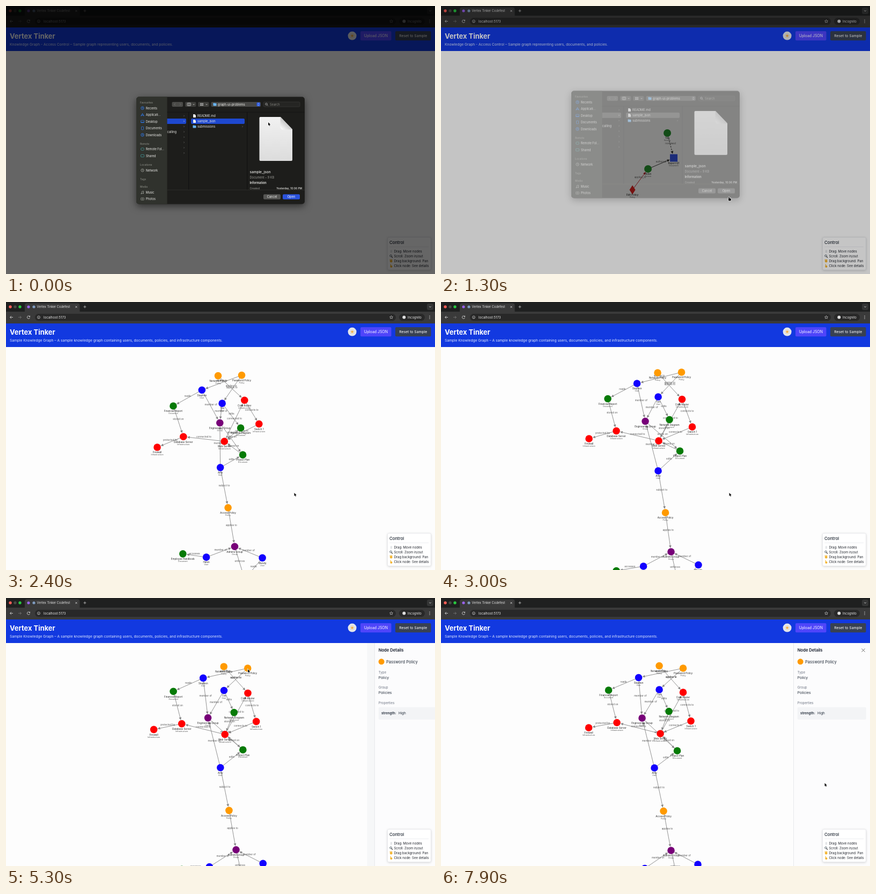
An HTML page with a canvas for the animation above (8000 ms loop, 800 px wide and 500 px high).

```html
<!DOCTYPE html>
<html lang="en">
<head>
<meta charset="utf-8">
<title>Vertex Tinker</title>
<style>
html, body { margin: 0; width: 100%; height: 100%; overflow: hidden; background: #fdfdfd; }
canvas { display: block; width: 800px; height: 500px; }
</style>
</head>
<body>
<canvas id="stage" width="800" height="500"></canvas>
<script>
const LOOP = 8000, LOAD = 1550;
const stage = document.getElementById('stage').getContext('2d');
const sheet = Object.assign(document.createElement('canvas'), { width: 800, height: 500 }).getContext('2d');
let g = stage;

const clamp = x => Math.max(0, Math.min(1, x));
const mix = (a, b, u) => a + (b - a) * u;
const span = (t, a, b) => clamp((t - a) / (b - a));
const smooth = u => u * u * (3 - 2 * u);

// ---------- drawing helpers ----------
function text(s, x, y, size, color, weight = 400, align = 'left') {
  g.font = `${weight} ${size}px Inter, "Open Sans", sans-serif`;
  g.textAlign = align;
  g.fillStyle = color;
  g.fillText(s, x, y + size * .36);
}
function box(x, y, w, h, color, r = 0, stroke) {
  g.beginPath();
  g.roundRect(x, y, w, h, r);
  if (color) { g.fillStyle = color; g.fill(); }
  if (stroke) { g.strokeStyle = stroke; g.lineWidth = .7; g.stroke(); }
}
function dot(x, y, r, color) {
  g.beginPath();
  g.arc(x, y, r, 0, 7);
  g.fillStyle = color;
  g.fill();
}
function ring(x, y, r, color, width = .8) {
  g.beginPath();
  g.arc(x, y, r, 0, 7);
  g.strokeStyle = color;
  g.lineWidth = width;
  g.stroke();
}
function line(points, color, width = .8) {
  g.beginPath();
  for (let i = 0; i < points.length; i += 2) g.lineTo(points[i], points[i + 1]);
  g.strokeStyle = color;
  g.lineWidth = width;
  g.stroke();
}
function poly(points, color) {
  g.beginPath();
  for (let i = 0; i < points.length; i += 2) g.lineTo(points[i], points[i + 1]);
  g.closePath();
  g.fillStyle = color;
  g.fill();
}
function cross(x, y, r, color, width) {
  line([x - r, y - r, x + r, y + r], color, width);
  line([x - r, y + r, x + r, y - r], color, width);
}
const chevron = (x, y, color, r = 1.2) => line([x - r / 2, y - r, x + r / 2, y, x - r / 2, y + r], color, .7);
const caret = (x, y, color, r = 1.4) => line([x - r, y - r / 2, x, y + r / 2, x + r, y - r / 2], color, .8);

// ---------- graph data ----------
const COLORS = { Policy: '#ff9a00', User: '#1200ff', Infrastructure: '#ff0000', Group: '#770078', Document: '#067a06' };
const NODES = `Network Policy:Policy|Password Policy:Policy|Stephen:User|Core Router:Infrastructure|Tim:User|
Switch 1:Infrastructure|Engineering Group:Group|Financial Report:Document|Web Server:Infrastructure|
Network Diagram:Document|Database Server:Infrastructure|Firewall:Infrastructure|Project Plan:Document|Amy:User|
Access Policy:Policy|Employee Handbook:Document|Helen:User|Admins Group:Group|Wendy:User|Security Policy:Document`
  .replace(/\n/g, '').split('|').map(s => s.split(':'));
const EDGES = `0>3 applies to|1>2 applies to|1>4 applies to|2>7 reads|2>6 member of|4>6 member of|4>9 edits|
3>5 connects to|5>8 connects to|8>3 connected to|7>10 stored on|8>10 connected to|10>11 protected by|
9>8 stored on|12>8 stored on|6>12 works on|13>6 member of|13>12 edits|13>14 subject to|14>17 applies to|
16>17 member of|16>15 accesses|18>17 member of|18>19 reads|17>19 enforces`
  .replace(/\n/g, '').split('|').map(s => s.match(/(\d+)>(\d+) (.*)/).slice(1));
// per node: first spread, stretched, settled
const POSES = [
  [377, 150, 404, 132, 407, 126.5], [420, 149, 448.5, 131, 451.5, 131],
  [365, 191, 365.5, 152, 368.5, 148.5], [434.5, 187, 449.5, 181.5, 451.5, 176],
  [399, 215.5, 405, 177, 407, 171], [479, 215.5, 468.5, 233, 466, 229.5],
  [437.5, 232, 381, 222.5, 375, 224], [314, 223.5, 311, 180.5, 312.5, 172],
  [410, 262, 406, 259, 409, 253], [463, 268.5, 426, 219.5, 425, 211.5],
  [339, 274.5, 327, 240.5, 328, 232.5], [295, 306, 276, 255, 275.5, 242],
  [433, 300.5, 445.5, 278, 440.5, 285], [388, 295.5, 405, 315, 398, 317],
  [404.5, 364, 418.5, 393, 415, 397.5], [336, 401, 327, 501.5, 328, 508],
  [365, 439.5, 377.5, 493, 380, 504.5], [421, 435, 429, 466, 429, 471],
  [474, 449, 480, 490.5, 479, 497], [447.5, 487.5, 444, 531, 444, 537]
];
const SETTLE = [[3000, 0], [3400, .27], [3800, .46], [4500, .61], [5300, .74], [6500, .89], [7900, 1]];

function along(keys, t) {
  const i = keys.findIndex(k => k[0] > t);
  if (i < 0) return keys[keys.length - 1][1];
  if (!i) return keys[0][1];
  return mix(keys[i - 1][1], keys[i][1], span(t, keys[i - 1][0], keys[i][0]));
}
function place([ax, ay, bx, by, cx, cy], t) {
  if (t < 1900) {
    const k = mix(.4, 1, span(t, LOAD, 1900));
    return [mix(395, ax, k), mix(290, ay, k)];
  }
  if (t < 3000) {
    const u = 1 - (1 - span(t, 1900, 3000)) ** 1.9;
    return [mix(ax, bx, u), mix(ay, by, u)];
  }
  const u = along(SETTLE, t);
  return [mix(bx, cx, u), mix(by, cy, u)];
}

function arrow([x1, y1], [x2, y2], color, gap = 7) {
  const d = Math.hypot(x2 - x1, y2 - y1) || 1, dx = (x2 - x1) / d, dy = (y2 - y1) / d;
  const ex = x2 - dx * gap, ey = y2 - dy * gap, bx = ex - dx * 5, by = ey - dy * 5;
  line([x1, y1, bx, by], color, .9);
  poly([ex, ey, bx - dy * 2.4, by + dx * 2.4, bx + dy * 2.4, by - dx * 2.4], color);
}
function edgeLabel([x1, y1], [x2, y2], s) {
  text(s, (x1 + x2) / 2, (y1 + y2) / 2 - 3.8, 4.5, '#505050', 400, 'center');
}
function nodeLabel([x, y], name, kind, weight) {
  text(name, x, y + 9.7, 4.5, '#222', weight, 'center');
  text(kind, x, y + 14, 3.6, '#555', 400, 'center');
}
function graph(t) {
  const at = POSES.map(p => place(p, t));
  for (const [a, b] of EDGES) arrow(at[a], at[b], '#858585');
  for (const [a, b, s] of EDGES) edgeLabel(at[a], at[b], s);
  NODES.forEach(([, kind], i) => dot(...at[i], 6.8, COLORS[kind]));
  NODES.forEach(([name, kind], i) => nodeLabel(at[i], name, kind));
}
function firstGraph() {
  const tim = [422, 237], report = [434, 283.5], helen = [386, 304], policy = [357, 343];
  g.setLineDash([3, 2]);
  arrow(tim, report, '#111', 8);
  g.setLineDash([]);
  arrow(helen, report, '#111', 8);
  arrow(policy, helen, '#c00010');
  edgeLabel(tim, report, 'reviewed');
  edgeLabel(helen, report, 'authored');
  edgeLabel(policy, helen, 'applies_to');
  dot(...tim, 7, '#12881c');
  dot(...helen, 7, '#12881c');
  box(427, 276.5, 14, 14, '#2446e8');
  poly([357, 334.5, 362.5, 343, 357, 351.5, 351.5, 343], '#e01010');
  nodeLabel(tim, 'Tim', 'Person', 500);
  nodeLabel(helen, 'Helen', 'Person', 500);
  nodeLabel(report, 'Report Q1', 'Document', 500);
  nodeLabel(policy, 'Edit Policy', 'Policy', 500);
}

// ---------- page ----------
function browser() {
  box(0, 0, 800, 18, '#1f2020');
  box(0, 18, 800, 22, '#3a3a3a');
  box(35, 2.5, 102.5, 18, '#3a3a3a', [4, 4, 0, 0]);
  dot(8, 9, 2.7, '#ff5f57');
  dot(17, 9, 2.7, '#484a44');
  dot(26, 9, 2.7, '#28c840');
  dot(42, 9, 2.6, '#9a62f0');
  dot(52, 9, 2.6, '#7f9cc0');
  g.save();
  g.beginPath();
  g.rect(57, 2, 64, 16);
  g.clip();
  text('Vertex Tinker Codefest', 57.5, 9.2, 5.7, '#e4e4e4');
  g.restore();
  cross(131, 9.2, 1.6, '#ddd');
  line([144.5, 9, 149.5, 9], '#ccc');
  line([147, 6.5, 147, 11.5], '#ccc');
  box(785, 3, 12, 12, '#343535', 3);
  caret(791, 9, '#ddd', 1.8);

  line([13, 28.5, 7.5, 28.5], '#ddd');
  line([10, 26, 7.5, 28.5, 10, 31], '#ddd');
  line([23, 28.5, 28.5, 28.5], '#777');
  line([26, 26, 28.5, 28.5, 26, 31], '#777');
  g.beginPath();
  g.arc(42, 28.5, 2.6, .3, 5.6);
  g.strokeStyle = '#ddd';
  g.stroke();
  poly([42.5, 27.8, 45, 27.8, 45, 25.3], '#ddd');
  box(54, 22, 673, 13.2, '#282828', 6.6);
  ring(61, 28.5, 2.5, '#ccc');
  line([61, 28, 61, 30], '#ccc');
  text('localhost:5173', 70, 28.6, 6.2, '#e8e8e8');
  const star = [];
  for (let i = 0; i < 11; i++) {
    const r = i % 2 ? 1.5 : 3.1, a = i * Math.PI / 5;
    star.push(718.5 + r * Math.sin(a), 28.6 - r * Math.cos(a));
  }
  line(star, '#ccc', .7);
  box(733, 22, 48, 13.2, '#282828', 6.6);
  dot(742.3, 28.6, 3, '#dedede');
  text('Incognito', 749, 28.6, 5.9, '#e8e8e8');
  for (const y of [26, 28.5, 31]) dot(790, y, .65, '#ddd');
}
function header(loaded) {
  box(0, 40, 800, 44, '#1239e0');
  text('Vertex Tinker', 7, 56, 12.9, '#fff', 700);
  text(loaded
    ? 'Sample Knowledge Graph – A sample knowledge graph containing users, documents, policies, and infrastructure components.'
    : 'Knowledge Graph - Access Control – Sample graph representing users, documents, and policies.',
    7, 72, 6.65, '#dfe8ff');
  dot(645.6, 55.6, 8, '#e4e6ea');
  dot(645.6, 55.6, 2.2, '#f2b04a');
  for (let i = 0; i < 8; i++) {
    const a = i * Math.PI / 4;
    dot(645.6 + 3.6 * Math.cos(a), 55.6 + 3.6 * Math.sin(a), .5, '#eda53c');
  }
  box(661, 47, 57.5, 17.3, '#4f45fa', 2);
  text('Upload JSON', 689.8, 55.8, 6.9, '#fff', 400, 'center');
  box(726, 47, 66.5, 17.3, '#384152', 2);
  text('Reset to Sample', 759.2, 55.8, 6.8, '#fff', 400, 'center');
}
function controls() {
  g.save();
  g.shadowColor = 'rgba(0,0,0,.18)';
  g.shadowBlur = 4;
  g.shadowOffsetY = 1;
  box(711.5, 431.5, 81, 61, '#fff', 2.5);
  g.restore();
  box(711.5, 431.5, 81, 61, null, 2.5, '#e2e4e8');
  text('Control', 715, 441.2, 7.8, '#1c2430', 500);
  line([715, 449.3, 788, 449.3], '#e4e6ea', .7);
  ['Drag: Move nodes', 'Scroll: Zoom in/out', 'Drag background: Pan', 'Click node: See details']
    .forEach((s, i) => text(s, 723.4, 458 + i * 9, 6.05, '#20242c'));
  box(716.7, 455, 3.4, 5.6, '#e3e5e7', 1.7);
  ring(717.6, 466, 1.8, '#41505c', .9);
  line([718.9, 467.4, 721, 469.6], '#333', 1.2);
  for (let i = 0; i < 4; i++) line([716.2 + i * 1.2, 475, 716 + i * 1.3, 472.6], '#f3b532', .9);
  dot(718.2, 476.3, 2.3, '#f3b532');
  line([717.4, 485, 717.4, 481.6], '#f3b532', 1.1);
  dot(718.4, 486, 2.1, '#f3b532');
}
function details(t) {
  const u = span(t, 5130, 5430);
  if (!u) return;
  const x = 657.5 + 142.5 * (1 - u) ** 1.85;
  if (u < 1) box(x - 14, 84, 14, 416, '#f6f7f8');
  box(x, 84, 143, 416, '#fcfcfd');
  line([x, 84, x, 500], '#e1e4e8', .8);
  text('Node Details', x + 7.3, 97.6, 7.6, '#111827', 600);
  cross(x + 130, 97.5, 3, '#555', .9);
  dot(x + 12.7, 118.8, 5.5, COLORS.Policy);
  text('Password Policy', x + 21.5, 119, 7.6, '#1f2937');
  [['Type', 'Policy', 138.7], ['Group', 'Policies', 167]].forEach(([label, value, y]) => {
    text(label, x + 7.3, y, 6.1, '#6b7280');
    text(value, x + 7.3, y + 9.7, 6.8, '#1f2937');
  });
  text('Properties', x + 7.3, 195.7, 6.1, '#6b7280');
  box(x + 7.3, 203.7, 128, 23, '#f3f4f6', 2);
  text('strength:', x + 12.5, 214.7, 6.3, '#1f2937', 600);
  text('High', x + 44.5, 214.7, 6.3, '#1f2937');
}

// ---------- file dialog ----------
const SIDEBAR = [
  ['Favourites', 180.5, 'Recents', 190.5, 'Applicati...', 203, 'Desktop', 215.5, 'Documents', 228, 'Downloads', 240.5],
  ['Remote', 257, 'Remote Fol...', 267, 'Shared', 279.5],
  ['Locations', 296.5, 'Network', 306.5], ['Tags', 323.5],
  ['Media', 337.5, 'Music', 348, 'Photos', 360]
];
function page(x, y) {
  poly([x, y - 3, x + 3, y - 3, x + 5, y - 1, x + 5, y + 3, x, y + 3], '#eee');
}
function folder(x, y) {
  box(x, y - 2.6, 3, 2, '#4f9fe8', .6);
  box(x, y - 2, 6, 4.6, '#69b5f5', .7);
}
function sidebarIcon(name, x, y) {
  const c = /Network|Music|Photos/.test(name) ? '#9a9c96' : /Remote|Shared/.test(name) ? '#45a5a8' : '#2f7cf0';
  if (/Recents|Downloads|Network/.test(name)) {
    ring(x, y, 2.7, c, .9);
    line([x, y - 1.6, x, y + .4, x + 1.2, y + .4], c, .8);
  } else if (name[0] === 'A') {
    line([x - 2.6, y + 2.6, x, y - 2.6, x + 2.6, y + 2.6], c, .9);
    line([x - 3, y + 1, x + 3, y + 1], c, .8);
  } else if (name === 'Documents') {
    box(x - 2, y - 2.8, 4, 5.6, null, .6, c);
  } else if (name === 'Music') {
    line([x - 1.2, y + 2, x - 1.2, y - 2, x + 2, y - 2.7, x + 2, y + 1.4], c, .8);
    dot(x - 2, y + 2, 1, c);
    dot(x + 1.2, y + 1.5, 1, c);
  } else {
    box(x - 3, y - 2.2, 6, 4.4, null, /Remote/.test(name) ? 2.1 : .8, c);
    if (name === 'Photos') ring(x, y, 1.1, c, .7);
    if (name === 'Desktop') line([x - 3, y + 1.4, x + 3, y + 1.4], c, 1);
  }
}
function dialog(focus) {
  const blue = focus ? '#1e48cf' : '#4a4a48', white = '#ecece9', grey = '#9a9a96';
  g.save();
  g.shadowColor = 'rgba(0,0,0,.55)';
  g.shadowBlur = 14;
  g.shadowOffsetY = 4;
  box(243, 169.5, 314, 200, '#1d1d1b', 5);
  g.restore();
  box(243, 169.5, 57.5, 200, '#30322d', [5, 0, 0, 5]);
  for (const [title, ty, ...items] of SIDEBAR) {
    text(title, 250, ty, 4.8, '#84867f', 500);
    for (let i = 0; i < items.length; i += 2) {
      sidebarIcon(items[i], 254.5, items[i + 1]);
      text(items[i], 260.7, items[i + 1], 5.6, white);
    }
  }
  box(309.5, 179, 20.5, 9, '#4b4b48', 2);
  line([316, 181.5, 313.5, 183.5, 316, 185.5], '#777', .7);
  chevron(325, 183.5, '#777', 2);
  box(334, 179, 20.5, 9, '#3d3d3a', 2);
  box(338, 181, 6.5, 5, null, .6, '#ddd');
  line([340.2, 181, 340.2, 186], '#ddd', .6);
  line([342.3, 181, 342.3, 186], '#ddd', .6);
  caret(350, 183.6, '#ddd');
  box(358, 179, 20.5, 9, '#3d3d3a', 2);
  for (let i = 0; i < 6; i++) box(362 + i % 3 * 2.2, 181.2 + (i > 2) * 2.7, 1.6, 2, '#bbb');
  caret(374, 183.6, '#ddd');
  box(382.5, 179, 92.5, 9, '#484846', 2);
  folder(386.5, 183.6);
  text('graph-ui-problems', 395, 183.5, 5.7, white);
  box(467.5, 180, 6.5, 7, focus ? '#2a58dd' : '#555', 1.5);
  caret(470.7, 185, '#fff', 1.1);
  line([469.6, 182.6, 470.7, 181.5, 471.8, 182.6], '#fff', .7);
  box(480, 179, 68, 9, '#252523', 2, '#3a3a37');
  ring(485.5, 183, 1.8, '#bbb');
  line([486.8, 184.3, 488.6, 186.2], '#bbb');
  text('Search', 492, 183.6, 5.6, '#85857f');

  line([300.5, 198, 557, 198], '#111', .7);
  line([340.7, 198, 340.7, 343], '#111110', 1);
  line([449.7, 198, 449.7, 343], '#111110', 1);
  box(300.5, 210, 35.5, 10, blue, [0, 2, 2, 0]);
  for (let i = 0; i < 8; i++) chevron(332, 205 + i * 9.9, i === 1 ? '#ddd' : '#777');
  text('calling', 300.5, 234.7, 5.7, white);
  box(345, 210, 100, 10, blue, 2);
  page(349, 205);
  page(349, 215);
  folder(348.5, 225);
  chevron(441, 225, '#777');
  ['README.md', 'sample_json', 'submissions'].forEach((s, i) => text(s, 357, 205 + i * 9.9, 5.7, white));

  const paper = g.createLinearGradient(0, 207, 0, 289);
  paper.addColorStop(0, '#f1f1f1');
  paper.addColorStop(1, '#dcdcdc');
  g.beginPath();
  g.roundRect(472.5, 207, 61.5, 82, 2);
  g.fillStyle = paper;
  g.fill();
  poly([511, 206, 535, 206, 535, 231], '#1d1d1b');
  const fold = g.createLinearGradient(513, 229, 524, 217);
  fold.addColorStop(0, '#fafafa');
  fold.addColorStop(1, '#c2c2c2');
  poly([511.5, 207, 511.5, 227, 514.5, 230.5, 534, 230.5], fold);
  text('sample_json', 454.5, 310, 6.5, white, 500);
  text('Document – 9 KB', 454.5, 319.6, 5.6, grey);
  text('Information', 454.5, 330, 5.6, white, 600);
  text('Created', 454.5, 340, 4.9, grey);
  text('Yesterday, 10:06 PM', 552, 340, 4.9, white, 500, 'right');
  line([300.5, 343.2, 557, 343.2], '#343432', .7);
  box(480, 351.3, 32, 9.4, '#565654', 2);
  text('Cancel', 496, 356, 5.7, white, 400, 'center');
  box(516, 351.3, 32, 9.4, focus ? '#2a52dc' : '#565654', 2);
  text('Open', 532, 356, 5.7, '#fff', 400, 'center');
}

// ---------- pointer ----------
const POINTER = [[0, 489, 217], [300, 489, 217], [1000, 537.5, 356], [3700, 537.5, 356], [3800, 539, 356.5],
  [4900, 451, 133], [5900, 451, 133], [7200, 715.5, 345.3], [8000, 715.5, 345.3]];
function pointer(t) {
  const i = POINTER.findIndex(k => k[0] > t), a = POINTER[i - 1], b = POINTER[i];
  const u = smooth(span(t, a[0], b[0]));
  g.save();
  g.translate(mix(a[1], b[1], u), mix(a[2], b[2], u));
  g.beginPath();
  if (t > 1120 && t < 1700) {
    g.roundRect(-1.6, 2.8, 5, 4.8, 1.5);
    g.roundRect(-1.2, .2, 1.6, 5, .8);
  } else {
    [[0, 0], [0, 6], [1.4, 4.8], [2.3, 6.9], [3.3, 6.5], [2.5, 4.4], [4.3, 4.3]].forEach(p => g.lineTo(...p));
    g.closePath();
  }
  g.strokeStyle = '#fff';
  g.lineWidth = 1.4;
  g.stroke();
  g.fillStyle = '#111';
  g.fill();
  g.restore();
}

function frame(now) {
  const t = now % LOOP, loaded = t >= LOAD, shown = 1 - span(t, 1100, 1425);
  g = stage;
  box(0, 0, 800, 500, '#fdfdfd');
  if (loaded) graph(t); else firstGraph();
  details(t);
  browser();
  header(loaded);
  controls();
  if (shown) {
    box(0, 0, 800, 500, `rgba(0,0,0,${.6 * shown})`);
    box(0, 0, 800, 40, `rgba(0,0,0,${.55 * shown * shown})`);
    g = sheet;
    g.clearRect(0, 0, 800, 500);
    dialog(t < 1100);
    g = stage;
    g.globalAlpha = shown;
    g.drawImage(sheet.canvas, 0, -18 * (1 - shown));
    g.globalAlpha = 1;
  }
  pointer(t);
  requestAnimationFrame(frame);
}
requestAnimationFrame(frame);
</script>
</body>
</html>
```
